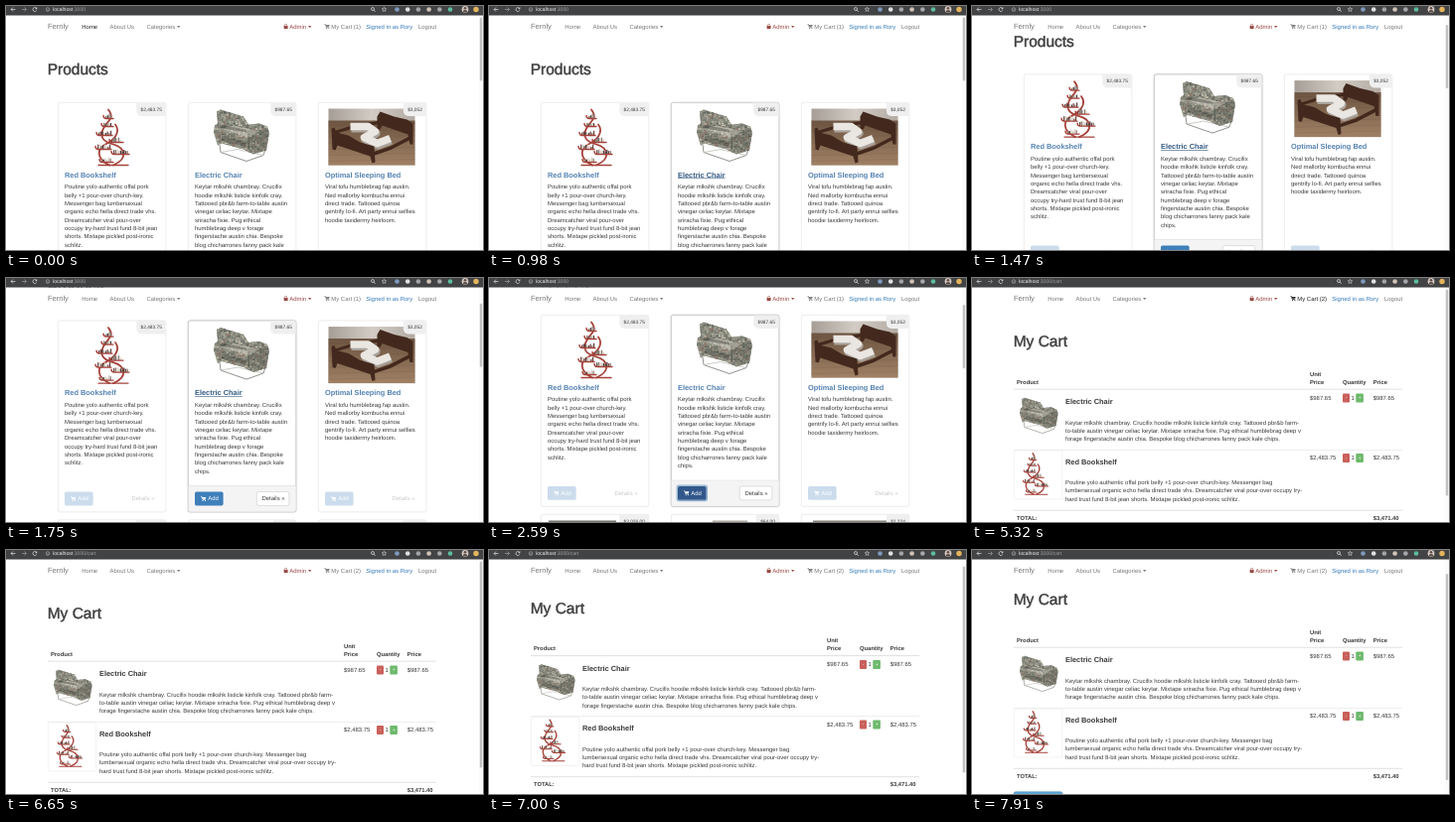
Write an HTML page with a canvas that moves like this. It is 480x246 px and loops after 7980 ms.

```html
<!DOCTYPE html>
<html lang="en">
<head>
<meta charset="utf-8">
<title>Shop</title>
<style>
html, body { margin: 0; width: 100%; height: 100%; overflow: hidden; background: #fff; }
canvas { display: block; width: 480px; height: 246px; }
</style>
</head>
<body>
<canvas></canvas>
<script>
const LOOP = 7980, STEP = 70, W = 480, H = 246;
const canvas = document.querySelector('canvas');
const ctx = canvas.getContext('2d');
const dpr = window.devicePixelRatio || 1;
canvas.width = W * dpr;
canvas.height = H * dpr;

const SANS = '"Liberation Sans", Arial, sans-serif';
const INK = '#3a3a3a', MUTED = '#777', LINK = '#5582b2', LINK_HOVER = '#335a82';
const LEADING = 8.33;

const products = [
  { name: 'Red Bookshelf', price: '$2,483.75', art: drawShelf, artX: 36, text: [
    'Poutine yolo authentic offal pork', 'belly +1 pour-over church-key.',
    'Messenger bag lumbersexual', 'organic echo hella direct trade vhs.',
    'Dreamcatcher viral pour-over', 'occupy try-hard trust fund 8-bit jean',
    'shorts. Mixtape pickled post-ironic', 'schlitz.'] },
  { name: 'Electric Chair', price: '$987.65', art: drawChair, artX: 26, text: [
    'Keytar mlkshk chambray. Crucifix', 'hoodie mlkshk listicle kinfolk cray.',
    'Tattooed pbr&b farm-to-table austin', 'vinegar celiac keytar. Mixtape',
    'sriracha fixie. Pug ethical', 'humblebrag deep v forage',
    'fingerstache austin chia. Bespoke', 'blog chicharrones fanny pack kale', 'chips.'] },
  { name: 'Optimal Sleeping Bed', price: '$3,052', art: drawBed, artX: 10.5, text: [
    'Viral tofu humblebrag fap austin.', 'Ned mallorby kombucha ennui',
    'direct trade. Tattooed quinoa', 'gentrify lo-fi. Art party ennui selfies',
    'hoodie taxidermy heirloom.'] }
];

const clamp = v => Math.max(0, Math.min(1, v));
const smooth = v => { v = clamp(v); return v * v * (3 - 2 * v); };
const ramp = (t, from, to) => smooth((t - from) / (to - from));
const within = (t, from, to) => t >= from && t < to;

function random(seed) {
  return () => (seed = (seed * 16807) % 2147483647) / 2147483647;
}

// y is the vertical middle of the lowercase letters
function label(str, x, y, size = 5.95, color = INK, bold = false, align = 'left') {
  ctx.font = `${bold ? 'bold ' : ''}${size}px ${SANS}`;
  ctx.textAlign = align;
  ctx.fillStyle = color;
  ctx.fillText(str, x, y + size * 0.34);
}

// A thin outline gives the regular face a medium weight
function heading(str) {
  const size = 15.5, color = '#404040';
  label(str, 41.7, 64, size, color);
  ctx.strokeStyle = color;
  ctx.lineWidth = 0.45;
  ctx.strokeText(str, 41.7, 64 + size * 0.34);
}

function rect(x, y, w, h, color) {
  ctx.fillStyle = color;
  ctx.fillRect(x, y, w, h);
}

function box(x, y, w, h, r, fill, stroke, width = 0.6) {
  ctx.beginPath();
  ctx.roundRect(x, y, w, h, r);
  if (fill) { ctx.fillStyle = fill; ctx.fill(); }
  if (stroke) { ctx.strokeStyle = stroke; ctx.lineWidth = width; ctx.stroke(); }
}

function dot(x, y, r, color) {
  ctx.fillStyle = color;
  ctx.beginPath();
  ctx.arc(x, y, r, 0, 7);
  ctx.fill();
}

function poly(points, color) {
  ctx.fillStyle = color;
  ctx.beginPath();
  points.forEach(([x, y]) => ctx.lineTo(x, y));
  ctx.fill();
}

function line(points, color, width) {
  ctx.strokeStyle = color;
  ctx.lineWidth = width;
  ctx.beginPath();
  points.forEach(([x, y]) => ctx.lineTo(x, y));
  ctx.stroke();
}

function placed(x, y, scale, draw) {
  ctx.save();
  ctx.translate(x, y);
  ctx.scale(scale, scale);
  draw();
  ctx.restore();
}

function drawShelf() {
  const red = '#a5423a', rnd = random(11);
  ctx.lineCap = 'round';
  ctx.strokeStyle = red;
  ctx.lineWidth = 1.8;
  ctx.stroke(new Path2D('M20 57C36 50 31 39 20 36S6 28 10 20S22 10 15 1M16 57C2 50 4 40 12 36S28 24 22 16'));
  const shelves = [[10, 10, 10], [8, 18, 12], [3, 27, 16], [16, 34, 14], [2, 41, 16], [18, 46, 18], [6, 54, 14]];
  for (const [x, y, w] of shelves) {
    for (let i = 2; i < w - 2; i += 1.7) {
      const h = 2.5 + rnd() * 2.5;
      rect(x + i, y - h, 1.3, h, ['#473b38', '#8a8075', '#6a4440', '#d4cfc5'][rnd() * 4 | 0]);
    }
    ctx.strokeStyle = red;
    ctx.lineWidth = 1.4;
    ctx.beginPath();
    ctx.moveTo(x, y - 3);
    ctx.quadraticCurveTo(x, y, x + 3, y);
    ctx.lineTo(x + w, y);
    ctx.stroke();
  }
  line([[5, 57], [35, 57]], red, 1.4);
  ctx.lineCap = 'butt';
}

function drawChair() {
  const rnd = random(29);
  line([[6, 36], [7, 44], [33, 53], [50, 47], [52, 41]], '#85857f', 0.9);
  line([[7, 44], [24, 41], [50, 47]], '#b5b5ae', 0.7);
  ctx.save();
  ctx.beginPath();
  [[3, 3], [7, 1], [30, 8], [35, 16], [46, 15], [54, 18], [56, 24], [53, 42], [40, 46], [30, 41],
    [8, 35], [4, 37], [0, 24], [1, 17], [4, 15]].forEach(([x, y]) => ctx.lineTo(x, y));
  ctx.closePath();
  ctx.clip();
  rect(0, 0, 58, 54, '#8d8d81');
  const tones = ['#6b7065', '#aaa798', '#7d8278', '#c5bfae', '#8b7164', '#5a5f58', '#999a8c'];
  for (let y = 0; y < 48; y += 1.8)
    for (let x = 0; x < 58; x += 2.4)
      rect(x + rnd() * 1.5, y, 1 + rnd() * 1.5, 1.4, tones[rnd() * tones.length | 0]);
  poly([[8, 20], [20, 17], [46, 23], [34, 29]], 'rgba(215,212,200,.55)');
  poly([[5, 16], [32, 21], [34, 24], [8, 20]], 'rgba(50,52,46,.4)');
  poly([[8, 27], [34, 33], [33, 38], [8, 33]], 'rgba(50,52,46,.35)');
  poly([[34, 22], [55, 22], [53, 42], [40, 46], [34, 40]], 'rgba(50,52,46,.18)');
  ctx.restore();
}

function drawBed() {
  const wall = ctx.createLinearGradient(0, 0, 87, 0);
  wall.addColorStop(0, '#a69e96');
  wall.addColorStop(0.5, '#d2ccc4');
  wall.addColorStop(1, '#b3aba3');
  rect(0, 0, 87, 57, wall);
  const floor = ctx.createLinearGradient(0, 12, 0, 57);
  floor.addColorStop(0, '#6d5542');
  floor.addColorStop(1, '#a08165');
  rect(0, 12, 87, 45, floor);
  for (let i = 0; i < 7; i++) line([[0, 17 + i * 6], [87, 15 + i * 6]], 'rgba(75,48,30,.2)', 0.5);
  const wood = '#43291d';
  line([[6, 24], [26, 18], [51, 14]], wood, 3);
  line([[44, 46], [62, 40], [83, 29]], wood, 3.5);
  poly([[49, 8], [52, 3], [66, 8], [79, 11], [85, 15], [85, 36], [82, 36], [80, 26], [54, 17], [52, 21], [49, 20]], wood);
  ctx.lineJoin = 'round';
  const mattress = [[22, 18], [40, 18], [47, 23], [36, 29], [49, 35], [62, 30]];
  placed(1, 2, 1, () => line(mattress, '#aaa39c', 8));
  line(mattress, '#eae6e1', 7.5);
  ctx.lineJoin = 'miter';
  poly([[3, 20], [6, 19], [8, 24], [20, 27], [32, 34], [46, 38], [47, 54], [44, 55], [42, 48], [9, 37], [7, 42], [4, 41]], wood);
}

function cartIcon(x, y, color) {
  line([[x, y - 2], [x + 1.1, y - 2], [x + 1.9, y + 1], [x + 4.8, y + 1]], color, 0.7);
  poly([[x + 1.2, y - 1.5], [x + 5.3, y - 1.5], [x + 4.8, y + 0.3], [x + 1.8, y + 0.3]], color);
  dot(x + 2.1, y + 2, 0.55, color);
  dot(x + 4.5, y + 2, 0.55, color);
}

function caret(x, y, color) {
  poly([[x, y - 0.8], [x + 3.4, y - 0.8], [x + 1.7, y + 1]], color);
}

function drawBrowser(state) {
  rect(0, 0, W, 9.5, '#424345');
  const pale = '#d0d1d2';
  line([[9.5, 3.5], [5, 3.5]], pale, 0.8);
  line([[7, 1.5], [5, 3.5], [7, 5.5]], pale, 0.8);
  line([[16, 3.5], [20.5, 3.5]], '#929496', 0.8);
  line([[18.5, 1.5], [20.5, 3.5], [18.5, 5.5]], '#929496', 0.8);
  if (state.loading) {
    line([[27, 1.5], [31, 5.5]], pale, 0.8);
    line([[31, 1.5], [27, 5.5]], pale, 0.8);
  } else {
    ctx.strokeStyle = pale;
    ctx.lineWidth = 0.8;
    ctx.beginPath();
    ctx.arc(29, 3.5, 2, 0.5, 5.5);
    ctx.stroke();
    poly([[31.3, 1.1], [31.3, 3.3], [29.2, 3.1]], pale);
  }
  ctx.strokeStyle = '#bbb';
  ctx.lineWidth = 0.6;
  ctx.beginPath();
  ctx.arc(42, 3.5, 1.8, 0, 7);
  ctx.stroke();
  rect(41.7, 3.1, 0.6, 1.5, '#bbb');
  label('localhost', 47, 3.6, 5.15, '#f5f5f5');
  const end = 47 + ctx.measureText('localhost').width;
  label(state.cart ? ':3000/cart' : ':3000', end, 3.6, 5.15, '#a0a1a3');

  ctx.strokeStyle = pale;
  ctx.lineWidth = 0.8;
  ctx.beginPath();
  ctx.arc(369, 3, 1.5, 0, 7);
  ctx.stroke();
  line([[370.1, 4.1], [371.7, 5.7]], pale, 0.9);
  const star = Array.from({ length: 11 }, (_, i) => {
    const a = i * Math.PI / 5 - Math.PI / 2, r = i % 2 ? 1 : 2.4;
    return [380.5 + Math.cos(a) * r, 3.5 + Math.sin(a) * r];
  });
  line(star, pale, 0.6);
  ['#7f9cc0', '#e1e1e1', '#a0a4a8', '#d3c4b8', '#a5a9ad', '#5cbf9c']
    .forEach((color, i) => dot(393.5 + i * 10.7, 3.5, 2.3, color));
  dot(462, 3.5, 3.4, '#d2c8c2');
  dot(462, 2.3, 1.3, '#5b4a43');
  box(459.8, 4, 4.4, 2.6, [2, 2, 0, 0], '#5b4a43');
  dot(473, 3.5, 2.7, '#e6b45c');
}

function drawNav(state) {
  rect(0, 9.5, W, 20.5, '#fff');
  const y = 20.5, tone = name => state.nav === name ? '#222' : MUTED;
  label('Fernly', 42, y, 7.5, MUTED);
  label('Home', 76.3, y, 5.95, tone('home'));
  label('About Us', 104.6, y, 5.95, tone('about'));
  label('Categories', 141.5, y, 5.95, MUTED);
  caret(172, y + 0.4, MUTED);
  const red = '#9a4a47';
  box(279.6, y - 0.4, 4, 2.8, 0.4, red);
  ctx.strokeStyle = red;
  ctx.lineWidth = 0.7;
  ctx.beginPath();
  ctx.arc(281.6, y - 0.8, 1.3, Math.PI, 0);
  ctx.stroke();
  label('Admin', 285.3, y, 5.95, red);
  caret(304, y + 0.4, red);
  cartIcon(320.4, y, tone('cart'));
  label(`My Cart (${state.count})`, 327.3, y, 5.95, tone('cart'));
  label('Signed in as Rory', 362.3, y, 5.95, '#337ab7');
  label('Logout', 415, y, 5.95, MUTED);
}

function drawPrice(x, y, price) {
  ctx.font = `4.8px ${SANS}`;
  const w = ctx.measureText(price).width + 8;
  box(x + 108.6 - w, y + 0.4, w, 13.6, [0, 2, 0, 5], '#efefef');
  label(price, x + 104.8, y + 7, 4.8, INK, false, 'right');
}

function drawCard(product, x, y, state, hover) {
  const edge = Math.round(224 - 50 * hover);
  ctx.save();
  if (hover) {
    ctx.shadowColor = `rgba(0,0,0,${0.12 * hover})`;
    ctx.shadowBlur = 2 * dpr;
  }
  box(x + 0.3, y + 0.3, 108.6, 193, 2, '#fff', `rgb(${edge},${edge},${edge})`);
  ctx.restore();
  placed(x + product.artX, y + 6.5, 1, product.art);
  drawPrice(x, y, product.price);

  const active = hover > 0 && state.title;
  label(product.name, x + 7, y + 73, 7.4, active ? LINK_HOVER : LINK, true);
  if (active) rect(x + 7, y + 76.5, ctx.measureText(product.name).width, 0.6, LINK_HOVER);
  product.text.forEach((row, i) => label(row, x + 7, y + 85.4 + i * LEADING));

  ctx.save();
  ctx.globalAlpha = hover;
  box(x + 0.6, y + 167, 108, 26, [0, 0, 2, 2], '#f4f4f4');
  rect(x + 0.6, y + 166.7, 108, 0.6, '#ddd');
  const faded = 0.27 + 0.73 * hover;
  ctx.globalAlpha = faded;
  const add = hover ? state.add : 0;
  if (add === 2) box(x + 6.2, y + 172.2, 30.2, 15.4, 2, null, '#89afd0', 1.2);
  box(x + 7, y + 173, 28.6, 13.8, 1.6, ['#3f7fba', '#326597', '#32578a'][add]);
  ctx.globalAlpha = 1;
  cartIcon(x + 13, y + 179.8, '#fff');
  label('Add', x + 20.3, y + 179.8, 5.95, '#fff');
  if (hover) box(x + 69.3, y + 173, 32.5, 13.8, 1.6, '#fff', `rgba(204,204,204,${hover})`);
  ctx.globalAlpha = faded;
  label('Details »', x + 74.5, y + 179.8);
  ctx.restore();
}

function drawProducts(state) {
  ctx.save();
  ctx.translate(0, -state.scroll);
  heading('Products');
  products.forEach((p, i) => {
    const x = 52 + i * 131, next = 298;
    drawCard(p, x, 97, state, i === 1 ? state.card : 0);
    box(x + 0.3, next + 0.3, 108.6, 193, 2, '#fff', '#ddd');
    rect(x + [8, 42, 12][i], next + 6.5, [68, 35, 76][i], 10, ['#77736e', '#b0aaa1', '#87837b'][i]);
    drawPrice(x, next, ['$2,026.00', '$64.00', '$2,224'][i]);
  });
  ctx.restore();
}

function drawCartRow(product, y, imageX, imageY, scale, rows) {
  placed(imageX, imageY, scale, product.art);
  label(product.name, 94, y + 4, 7.4, INK, true);
  rows.forEach((row, i) => label(row, 94, y + 25 + i * LEADING));
  label(product.price, 340, y);
  box(373, y - 4, 7, 9, 1, '#c9605b');
  label('-', 376.5, y + 0.2, 5, '#fff', false, 'center');
  label('1', 383.1, y + 0.3, 5.95, INK, false, 'center');
  box(386.3, y - 4, 7.6, 9, 1, '#6eb96c');
  label('+', 390.1, y + 0.2, 5, '#fff', false, 'center');
  label(product.price, 403.7, y);
}

function drawCart(state) {
  const [shelf, chair] = products;
  ctx.save();
  ctx.translate(0, -state.scroll);
  heading('My Cart');
  [['Product', 45, 105], ['Unit', 340, 97], ['Price', 340, 105], ['Quantity', 373, 105], ['Price', 403.7, 105]]
    .forEach(([str, x, y]) => label(str, x, y, 5.8, INK, true));
  rect(42, 111.7, 391, 0.9, '#ddd');
  drawCartRow(chair, 120.5, 48, 120, 0.69, [
    'Keytar mlkshk chambray. Crucifix hoodie mlkshk listicle kinfolk cray. Tattooed pbr&b farm-',
    'to-table austin vinegar celiac keytar. Mixtape sriracha fixie. Pug ethical humblebrag deep v',
    'forage fingerstache austin chia. Bespoke blog chicharrones fanny pack kale chips.']);
  rect(42, 173, 391, 0.5, '#ddd');
  box(42.3, 174, 48.5, 49, 1, null, '#e6e6e6', 0.5);
  drawCartRow(shelf, 181, 50, 176, 0.74, [
    'Poutine yolo authentic offal pork belly +1 pour-over church-key. Messenger bag',
    'lumbersexual organic echo hella direct trade vhs. Dreamcatcher viral pour-over occupy try-',
    'hard trust fund 8-bit jean shorts. Mixtape pickled post-ironic schlitz.']);
  rect(42, 233.8, 391, 0.9, '#ddd');
  label('TOTAL:', 45, 242, 5.8, INK, true);
  label('$3,471.40', 403.7, 242, 5.8, INK, true);
  box(42, 257.8, 49, 13, 2, '#5ea5d8', '#4c8dbd');
  ctx.restore();
}

function stateAt(t) {
  const cart = t >= 5250;
  let scroll = 0;
  if (t < 3220) scroll = 60 * ramp(t, 1060, 1910);
  else if (cart) scroll = 14 * ramp(t, 6790, 7280);
  const nav = t < 210 ? 'home'
    : within(t, 4620, 4690) ? 'about'
    : within(t, 4760, 6440) ? 'cart' : '';
  return {
    cart, scroll, nav,
    count: t < 3220 ? 1 : 2,
    loading: within(t, 2730, 3710),
    card: t < 3220 ? ramp(t, 770, 1050) : ramp(t, 3640, 3850) - ramp(t, 4410, 4620),
    title: within(t, 840, 1820) || within(t, 4060, 4480),
    add: within(t, 2590, 3220) ? 2 : within(t, 2240, 2590) ? 1 : 0
  };
}

function render(time) {
  const t = Math.floor((time % LOOP) / STEP) * STEP;
  const state = stateAt(t);
  ctx.setTransform(dpr, 0, 0, dpr, 0, 0);
  ctx.textBaseline = 'alphabetic';
  ctx.textRendering = 'geometricPrecision';
  rect(0, 0, W, H, '#fff');
  (state.cart ? drawCart : drawProducts)(state);
  drawNav(state);
  rect(476, 9.5, 4, H - 9.5, '#fafafa');
  box(476.8, 11.5 + state.scroll * (state.cart ? 0.9 : 0.26), 2.4, state.cart ? 208 : 64, 1.2, '#c1c1c1');
  drawBrowser(state);
}

const start = performance.now();
function tick() {
  render(performance.now() - start);
  requestAnimationFrame(tick);
}
tick();
</script>
</body>
</html>
```
